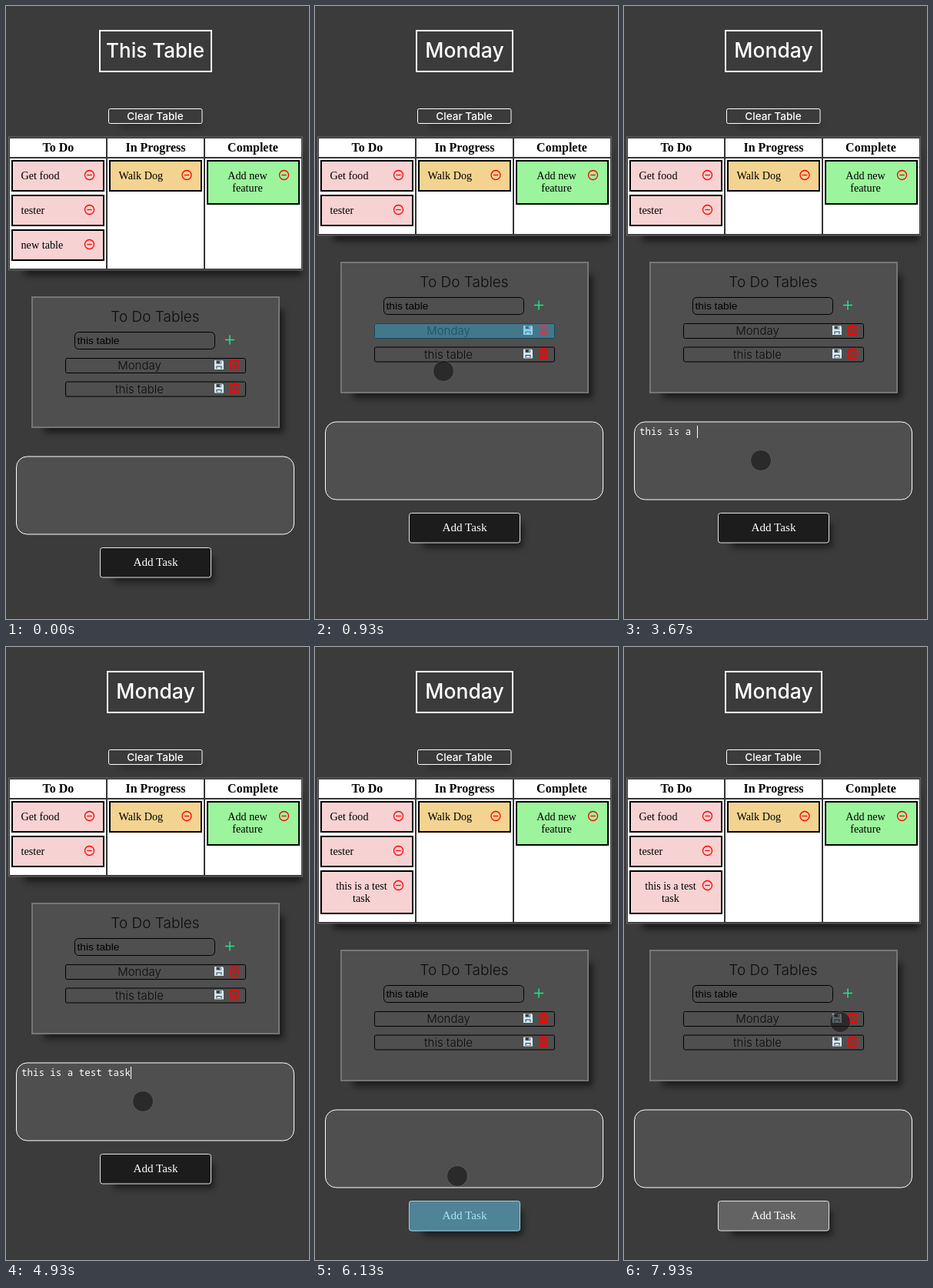
An HTML page that plays this animation: 394 px wide and 796 px high, repeating every 8 s.

```html
<!DOCTYPE html>
<html lang="en">
<head>
<meta charset="utf-8">
<title>Task board</title>
<style>
  html, body { margin: 0; width: 100%; height: 100%; overflow: hidden; background: #3b3b3b; }
  svg { display: block; position: absolute; left: 0; top: 0; }

  /* --first: initial table open, --added: new task listed, --shift: table height change */
  svg { animation: layout 8s step-end infinite; }
  @keyframes layout {
    0% { --first: 1; --added: 0; --shift: 0px; --button: #1c1c1c; }
    11.625% { --first: 0; --added: 0; --shift: -45px; --button: #1c1c1c; }
    76.625%, 100% { --first: 0; --added: 1; --shift: 16px; --button: #636363; }
  }
  .first { opacity: var(--first); }
  .monday { opacity: calc(1 - var(--first)); }
  .added { opacity: var(--added); }
  .lower { transform: translateY(var(--shift)); }
  .frame { height: calc(173px + var(--shift)); }
  .cell { height: calc(143px + var(--shift)); fill: #fff; }
  .table-shadow { height: calc(162px + var(--shift)); }

  .shadow { fill: #000; fill-opacity: .55; filter: blur(4px); }
  .sans { font-family: Inter, sans-serif; text-anchor: middle; }
  .title { font-size: 26.5px; font-weight: 500; fill: #fff; }
  .light { font-weight: 300; font-size: 15px; fill: #0c0c0c; }
  .head { font: bold 16px "Liberation Serif", serif; text-anchor: middle; }
  .task { font: 14.2px "Liberation Serif", serif; }
  .mid { text-anchor: middle; }
  .box { stroke: #000; stroke-width: 2; }
  .pink { fill: #f7d2d2; }
  .row { fill: none; stroke: #000; }
  .line { fill: none; stroke: #fff; }

  .tap { fill: #33b5e5; opacity: 0; }
  .tap-row { animation: tapRow 8s linear infinite; }
  .tap-button { animation: tapButton 8s linear infinite; }
  @keyframes tapRow {
    0%, 11.62% { opacity: 0; }
    11.625%, 11.7% { opacity: .4; }
    13.375%, 100% { opacity: 0; }
  }
  @keyframes tapButton {
    0%, 76.62% { opacity: 0; }
    76.625%, 76.7% { opacity: .4; }
    78.375%, 100% { opacity: 0; }
  }

  .pointer {
    fill: rgba(20, 20, 20, .62); stroke: rgba(125, 125, 125, .45);
    animation: move 8s linear infinite;
  }
  @keyframes move {
    0% { opacity: 0; transform: translate(81px, 119px); animation-timing-function: step-end; }
    .875% { opacity: 1; transform: translate(81px, 119px); animation-timing-function: ease-in-out; }
    5% { transform: translate(168px, 477px); animation-timing-function: step-end; }
    7.5% { transform: translate(165px, 475px); animation-timing-function: step-end; }
    11.625%, 15.25% { transform: translate(167px, 474px); animation-timing-function: ease-in-out; }
    19.125%, 69.125% { transform: translate(178px, 590px); animation-timing-function: ease-in-out; }
    74.125% { transform: translate(186px, 688px); }
    76.625%, 80.875% { transform: translate(185px, 687px); animation-timing-function: ease-in; }
    85.875% { transform: translate(275px, 543px); animation-timing-function: ease-out; }
    91.625% { transform: translate(288px, 488px); animation-timing-function: ease-in-out; }
    94.125% { transform: translate(283px, 466px); animation-timing-function: ease-in-out; }
    97% { transform: translate(278px, 503px); animation-timing-function: ease-in-out; }
    99.125%, 100% { opacity: 1; transform: translate(281px, 487px); }
  }

  .typing {
    position: absolute; left: 20px; top: 545px; height: 16px; overflow: hidden;
    font: 12.46px/16px "Noto Sans Mono", monospace; white-space: pre;
    color: #fff; border-right: 1px solid #fff;
    animation: type 8s linear infinite, focus 8s step-end infinite;
  }
  @keyframes focus {
    0% { opacity: 0; }
    22.5% { opacity: 1; }
    76.625%, 100% { opacity: 0; }
  }
  @keyframes type {
    0% { width: 0; }
    33.375% { width: 0; animation-timing-function: steps(4, start); }
    37.7% { width: 4ch; }
    38.375% { width: 4ch; animation-timing-function: steps(4, start); }
    43.875% { width: 8ch; }
    45% { width: 8ch; animation-timing-function: steps(2, start); }
    46.75% { width: 10ch; }
    50% { width: 10ch; animation-timing-function: steps(6, start); }
    57.95% { width: 16ch; }
    58.375% { width: 16ch; animation-timing-function: steps(3, start); }
    63.25%, 100% { width: 19ch; }
  }
</style>
</head>
<body>
<svg width="394" height="796" viewBox="0 0 394 796">
  <defs>
    <g id="remove" fill="none" stroke="#f00" stroke-width="1.3">
      <circle r="6"/>
      <path d="M-3.2 0H3.2"/>
    </g>
    <g id="tools">
      <path d="M271 460h10.500l1.500 1.500v10.500h-12z" fill="#d3e9f3"/>
      <path d="M273.500 460.500h6.500v4h-6.500zM273.500 467.500h7v3.500h-7z" fill="#39444a"/>
      <path d="M278 461h1.300v2.800h-1.300zM274.500 468.500h5v2.500h-5z" fill="#d3e9f3"/>
      <path d="M291 461h12M295 459.500h4M292.500 462v10h9v-10M295 464.500l4 5M299 464.500l-4 5" fill="none" stroke="#f00" stroke-width="1.8"/>
    </g>
  </defs>

  <g class="first">
    <rect class="line" x="122" y="32" width="145" height="53" stroke-width="2"/>
    <text class="sans title" x="194" y="67" style="font-size:26px">This Table</text>
  </g>
  <g class="monday">
    <rect class="line" x="132" y="32" width="125" height="53" stroke-width="2"/>
    <text class="sans title" x="194.500" y="67">Monday</text>
  </g>

  <rect class="shadow" x="148" y="145" width="106" height="13" style="fill-opacity:.25"/>
  <rect x="133.500" y="133.500" width="121.500" height="19" rx="2" fill="#3b3b3b" stroke="#fff"/>
  <text class="sans" x="194" y="148" font-size="13.600" font-weight="500" fill="#fff">Clear Table</text>

  <rect class="shadow table-shadow" x="24" y="188" width="360"/>
  <rect class="frame" x="3.500" y="170" width="382" fill="#35353a" stroke="#6c6c6c"/>
  <path d="M5 172h125v24H5zM132 172h125v24H132zM259 172h125v24H259z" fill="#fff"/>
  <rect class="cell" x="5" y="198" width="125"/>
  <rect class="cell" x="132" y="198" width="125"/>
  <rect class="cell" x="259" y="198" width="125"/>
  <text class="head" x="68" y="189">To Do</text>
  <text class="head" x="194.500" y="189">In Progress</text>
  <text class="head" x="321" y="189">Complete</text>

  <g class="task">
    <rect class="box pink" x="8" y="201" width="119" height="39"/>
    <text x="19.500" y="225">Get food</text>
    <use href="#remove" x="108.500" y="219.500"/>
    <rect class="box pink" x="8" y="246" width="119" height="39"/>
    <text x="19.500" y="270">tester</text>
    <use href="#remove" x="108.500" y="264.500"/>
    <g class="first">
      <rect class="box pink" x="8" y="291" width="119" height="39"/>
      <text x="19.500" y="315">new table</text>
      <use href="#remove" x="108.500" y="309.500"/>
    </g>
    <g class="added">
      <rect class="box pink" x="8" y="291" width="119" height="55"/>
      <text class="mid" x="60.500" y="315">this is a test</text>
      <text class="mid" x="60.500" y="331">task</text>
      <use href="#remove" x="108.500" y="309.500"/>
    </g>
    <rect class="box" x="135" y="201" width="119" height="39" fill="#f3d390"/>
    <text x="146.500" y="225">Walk Dog</text>
    <use href="#remove" x="235" y="219.500"/>
    <rect class="box" x="262" y="201" width="119" height="56" fill="#9cf49c"/>
    <text class="mid" x="314" y="225">Add new</text>
    <text class="mid" x="314" y="241">feature</text>
    <use href="#remove" x="361.500" y="219.500"/>
  </g>

  <g class="lower">
    <rect class="shadow" x="50" y="394" width="311" height="160"/>
    <rect x="34" y="378" width="321" height="169" fill="#4f4f4f" stroke="#767676" stroke-width="2"/>
    <text class="sans light" x="194" y="410" style="font-size:19px">To Do Tables</text>
    <rect class="row" x="89.500" y="423.500" width="182" height="22" rx="5"/>
    <text x="92.500" y="439" font-family="Liberation Sans, sans-serif" font-size="13.700">this table</text>
    <path d="M285 433.500h12M291 427.500v12" stroke="#1ee68c" stroke-width="1.500"/>

    <rect class="row" x="77.500" y="457.500" width="234" height="19" rx="2"/>
    <text class="sans light" x="173.500" y="472">Monday</text>
    <use href="#tools"/>
    <rect class="tap tap-row" x="77" y="457" width="235" height="20" rx="2"/>
    <rect class="row" x="77.500" y="488" width="234" height="19" rx="2"/>
    <text class="sans light" x="173.500" y="503">this table</text>
    <use href="#tools" y="30.500"/>

    <rect x="13.500" y="585" width="361" height="101" rx="14" fill="#4f4f4f" stroke="#fff"/>

    <rect class="shadow" x="140" y="716" width="130" height="32"/>
    <rect x="122.500" y="703.500" width="144" height="38.500" rx="3" stroke="#e4e4e4" style="fill:var(--button)"/>
    <text x="194.500" y="727" text-anchor="middle" font-family="Liberation Serif, serif" font-size="15.200" fill="#fff">Add Task</text>
    <rect class="tap tap-button" x="122" y="703" width="145" height="39.500" rx="3"/>
  </g>

  <circle class="pointer" r="13.500"/>
</svg>
<div class="typing">this is a test task</div>
</body>
</html>
```
